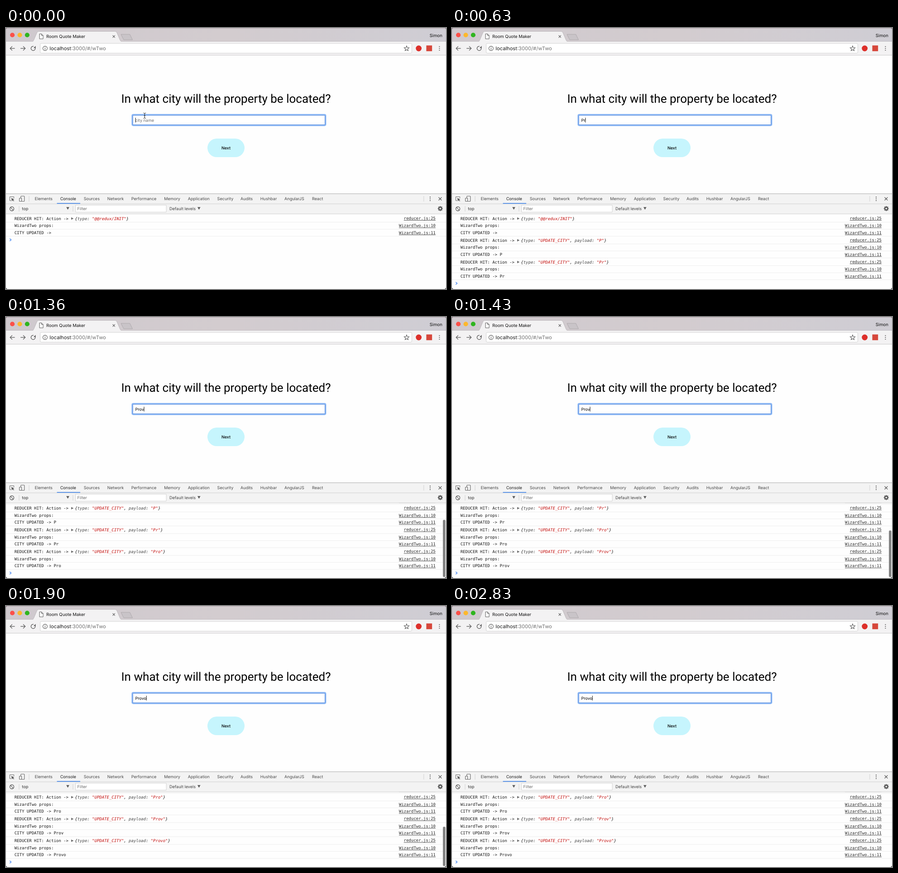
Animation, 972 px wide and 576 px high, one loop 3.03 s. Source, as an HTML page with a canvas:

```html
<!DOCTYPE html>
<html lang="en">
<head>
<meta charset="utf-8">
<title>Room Quote Maker</title>
<style>
html, body { margin: 0; width: 100%; height: 100%; overflow: hidden; background: #fefefe; }
canvas { display: block; width: 972px; height: 576px; }
</style>
</head>
<body>
<canvas id="stage"></canvas>
<script>
const W = 972, H = 576, LOOP = 3030;
const UI = "Inter, 'Liberation Sans', sans-serif";
const MONO = "'DejaVu Sans Mono', 'Liberation Mono', monospace";
const CITY = "Provo";
// Per letter: shown in the field, action logged, props logged.
const KEYS = [[130, 200, 230], [560, 600, 630], [960, 1000, 1030], [1360, 1400, 1430], [1830, 1860, 1900]];
const BLINK_OFF = 2330, BLINK_ON = 2830, FADE_STEP = 50, FADE_STEPS = 6;

const canvas = document.getElementById("stage");
const dpr = window.devicePixelRatio || 1;
canvas.width = W * dpr;
canvas.height = H * dpr;
const ctx = canvas.getContext("2d");

function rect(x, y, w, h, color) {
  ctx.fillStyle = color;
  ctx.fillRect(x, y, w, h);
}

function box(x, y, w, h, r, fill, stroke, width = 1) {
  ctx.beginPath();
  ctx.roundRect(x, y, w, h, r);
  paint(fill, stroke, width);
}

function disc(x, y, r, fill, stroke, width = 1) {
  ctx.beginPath();
  ctx.arc(x, y, r, 0, Math.PI * 2);
  paint(fill, stroke, width);
}

function poly(points, fill, stroke, width = 1, closed = true) {
  ctx.beginPath();
  points.forEach(([x, y]) => ctx.lineTo(x, y));
  if (closed) ctx.closePath();
  paint(fill, stroke, width);
}

function line(x1, y1, x2, y2, color, width = 1) {
  poly([[x1, y1], [x2, y2]], null, color, width, false);
}

function paint(fill, stroke, width) {
  if (fill) { ctx.fillStyle = fill; ctx.fill(); }
  if (stroke) { ctx.strokeStyle = stroke; ctx.lineWidth = width; ctx.stroke(); }
}

// Draws text and returns its width.
function text(str, x, y, size, color, family = UI, style = "", align = "left") {
  ctx.font = `${style} ${size}px ${family}`;
  ctx.textAlign = align;
  ctx.fillStyle = color;
  ctx.fillText(str, x, y);
  return ctx.measureText(str).width;
}

function cross(x, y, r, color, width) {
  line(x - r, y - r, x + r, y + r, color, width);
  line(x - r, y + r, x + r, y - r, color, width);
}

function dots(x, y, gap, color) {
  for (let i = -1; i <= 1; i++) disc(x, y + i * gap, 1.1, color);
}

function downArrow(x, y) {
  poly([[x - 3.3, y - 2.7], [x + 3.3, y - 2.7], [x, y + 3]], "#5a5a5a");
}

function navArrow(x, y, dir) {
  const tip = x + dir * 5.2;
  line(x - dir * 5.2, y, tip, y, "#5a5a5a", 1.3);
  poly([[tip - dir * 4.6, y - 4.6], [tip, y], [tip - dir * 4.6, y + 4.6]], null, "#5a5a5a", 1.3, false);
}

function star(x, y, r) {
  const points = [];
  for (let i = 0; i < 10; i++) {
    const a = -Math.PI / 2 + i * Math.PI / 5, d = i % 2 ? r * 0.45 : r;
    points.push([x + d * Math.cos(a), y + d * Math.sin(a)]);
  }
  poly(points, null, "#5a5a5a", 1.1);
}

function gear(x, y) {
  for (let i = 0; i < 4; i++) {
    const a = i * Math.PI / 4, dx = 5.5 * Math.cos(a), dy = 5.5 * Math.sin(a);
    line(x - dx, y - dy, x + dx, y + dy, "#5a5a5a", 2.1);
  }
  disc(x, y, 4.2, "#5a5a5a");
  disc(x, y, 1.8, "#f3f3f3");
}

function drawTabStrip() {
  const strip = ctx.createLinearGradient(0, 0, W, 0);
  strip.addColorStop(0, "#cfc9ce");
  strip.addColorStop(0.5, "#d3cccf");
  strip.addColorStop(1, "#cfcdd4");
  rect(0, 0, W, 30, strip);
  rect(0, 0, W, 1, "#b9abb3");
  rect(0, 29.5, W, 0.8, "#b4b0b4");
  ["#fb5049", "#fdb82c", "#2fb51f"].forEach((c, i) => disc(14 + i * 16.4, 15.5, 5.1, c));

  ctx.beginPath();
  ctx.moveTo(57, 31);
  ctx.quadraticCurveTo(60, 30, 61.5, 26.5);
  ctx.lineTo(68, 11);
  ctx.quadraticCurveTo(69.3, 7.5, 72, 7.5);
  ctx.lineTo(241, 7.5);
  ctx.quadraticCurveTo(244, 7.5, 245.3, 11);
  ctx.lineTo(251.8, 26.5);
  ctx.quadraticCurveTo(253.3, 30, 257, 31);
  paint("#f3f2f3", "#b4b0b4", 0.8);
  poly([[74, 13], [78.5, 13], [82, 16.5], [82, 24], [74, 24]], "#fff", "#5a5a5a", 1);
  poly([[78.5, 13], [78.5, 16.5], [82, 16.5]], null, "#5a5a5a", 1, false);
  text("Room Quote Maker", 89, 22, 9.5, "#111");
  cross(238.2, 18.7, 2.6, "#5a5a5a", 1.1);
  poly([[254, 14], [273.5, 14], [279.5, 26], [260, 26]], "#c9c4c8", "#aaa5a9", 0.9);
  text("Simon", 964, 20, 9.6, "#111", UI, "", "right");
}

function drawToolbar() {
  rect(0, 30, W, 30, "#f3f2f3");
  rect(0, 59.5, W, 1, "#c9c8c9");
  navArrow(14.3, 45, -1);
  navArrow(37.3, 45, 1);
  ctx.beginPath();
  ctx.arc(60, 45, 4.7, -0.5, Math.PI * 1.72 - 0.5, false);
  paint(null, "#5a5a5a", 1.3);
  poly([[65.5, 39.6], [65.5, 44.3], [60.8, 44.3]], "#5a5a5a");

  box(75.5, 34, 821, 21.5, 2.5, "#fff", "#cfcecf", 0.9);
  disc(86.3, 45, 4.9, null, "#5a5a5a", 1.1);
  rect(85.7, 44.2, 1.2, 3.6, "#5a5a5a");
  rect(85.7, 42, 1.2, 1.2, "#5a5a5a");
  const host = text("localhost", 96.3, 49, 11.15, "#1a1a1a");
  text(":3000/#/wTwo", 96.3 + host, 49, 11.15, "#707070");
  star(885, 45.3, 5.8);
  disc(911.7, 45, 6.4, "#dd2f2a");
  rect(928.5, 38.5, 12.7, 12.7, "#d6473b");
  dots(957.5, 45, 4, "#5a5a5a");
}

function drawPage(t, typed) {
  text("In what city will the property be located?", 486, 165, 26.05, "#000",
    "Roboto, sans-serif", "", "center");

  box(278.6, 191.1, 427.6, 24, 2.5, "#fff", "#8fbaf6", 2.6);
  box(280.1, 192.6, 424.6, 21, 1.2, null, "#5c90df", 1.3);
  let caret = 286;
  if (typed) caret = 285.5 + text(CITY.slice(0, typed), 285.5, 206.5, 9, "#000");
  else text("city name", 285.5, 206.5, 9, "#6c6c6c");
  if (t < BLINK_OFF || t >= BLINK_ON) rect(caret - 0.3, 198, 1, 10.5, "#111");
  if (!typed) drawIBeam(306.3, 193.5);

  box(445, 244, 82, 41, 20.5, "#c6f5fd");
  text("Next", 486, 267.8, 9, "#000", UI, "500", "center");
}

function drawIBeam(x, y) {
  line(x, y - 5.3, x, y + 5.3, "#333", 1.1);
  line(x - 1.8, y, x + 1.8, y, "#333", 0.9);
  for (const s of [-1, 1]) {
    poly([[x - 2.8, y + s * 6.2], [x, y + s * 5], [x + 2.8, y + s * 6.2]], null, "#333", 1, false);
  }
}

function drawDevtoolsBars() {
  const tabs = [["Elements", 63.6], ["Console", 119.7], ["Sources", 171.7], ["Network", 223.8],
    ["Performance", 276.7], ["Memory", 349.3], ["Application", 401.7], ["Security", 466.6],
    ["Audits", 518], ["Hushbar", 561.8], ["AngularJS", 615], ["React", 676]];
  rect(0, 365.5, W, 45, "#f3f3f3");
  rect(0, 365.3, W, 1, "#a8a8a8");
  rect(0, 387.6, W, 0.9, "#cccccc");
  rect(0, 409.8, W, 0.9, "#cccccc");
  rect(112.5, 386.3, 51.5, 1.6, "#4285e8");
  for (const [label, x] of tabs) text(label, x, 380.3, 9.1, label === "Console" ? "#1a1a1a" : "#484848");

  poly([[12, 381], [8.3, 381], [8.3, 372.5], [17.5, 372.5], [17.5, 375.5]], null, "#666", 1, false);
  poly([[11.5, 375.3], [18.5, 378], [15.6, 379.1], [18, 381.6], [17, 382.6], [14.7, 380.2], [13.5, 382.5]], "#5a5a5a");
  box(32.7, 371, 8, 11.5, 1, null, "#666", 1.1);
  box(29.5, 375.5, 5, 7, 0.8, "#f3f3f3", "#666", 1.1);
  for (const [x, y] of [[50.5, 371], [922.5, 371], [28.5, 393], [147.5, 393]]) rect(x, y, 0.9, 12, "#cccccc");
  dots(937, 377, 3.8, "#5a5a5a");
  cross(959, 377, 3.4, "#4a4a4a", 1.3);

  disc(13, 399, 4.5, null, "#5a5a5a", 1.3);
  line(9.9, 395.9, 16.1, 402.1, "#5a5a5a", 1.3);
  text("top", 35.3, 401.8, 9.1, "#2b2b2b");
  downArrow(136.5, 398);
  box(153.5, 391, 200.5, 15.3, 0, "#fff", "#cfcfcf", 0.9);
  text("Filter", 157.5, 401.8, 9.1, "#6c6c6c");
  text("Default levels", 361, 401.8, 9.1, "#404040");
  downArrow(426.3, 398);
  gear(959.3, 398.5);
}

// All console messages present at time t.
function messages(t) {
  const rows = [];
  const action = payload => rows.push({ payload, link: "reducer.js:25", height: 17, lift: 1 });
  const update = value => rows.push(
    { label: "WizardTwo props:", link: "WizardTwo.js:10", height: 15.5, lift: 0 },
    { label: "CITY UPDATED -> " + value, link: "WizardTwo.js:11", height: 15.5, lift: 0 });
  action("");
  update("");
  KEYS.forEach(([, logged, done], i) => {
    const value = CITY.slice(0, i + 1);
    if (t >= logged) action(value);
    if (t >= done) update(value);
  });
  return rows;
}

function drawAction(payload, y) {
  const dark = "#1c1c1c", grey = "#444", red = "#c20a08";
  const parts = [["{", dark], ["type", grey], [": ", dark]];
  if (payload) {
    parts.push(['"UPDATE_CITY"', red], [", ", dark], ["payload", grey], [": ", dark], [`"${payload}"`, red]);
  } else {
    parts.push(['"@@redux/INIT"', red]);
  }
  parts.push(["}", dark]);
  text("REDUCER HIT: Action ->", 18.7, y, 9, "#161616", MONO);
  poly([[144, y - 6], [149.3, y - 3.3], [144, y - 0.6]], "#6e6e6e");
  let x = 152.3;
  for (const [str, color] of parts) x += text(str, x, y, 8.97, color, MONO, "italic");
}

function drawConsole(t) {
  const rows = messages(t);
  const end = rows.reduce((sum, row) => sum + row.height, 411.5);
  const scroll = Math.max(0, end + 8 - 565);
  ctx.save();
  ctx.beginPath();
  ctx.rect(0, 410.7, W, H - 410.7);
  ctx.clip();
  let bottom = 411.5 - scroll;
  for (const row of rows) {
    bottom += row.height;
    if (bottom < 405) continue;
    const y = bottom - 4.7;
    if (row.label) text(row.label, 18.7, y, 9, "#161616", MONO);
    else drawAction(row.payload, y);
    const w = text(row.link, 949, y - row.lift, 8.97, "#262626", MONO, "", "right");
    rect(949 - w, y - row.lift + 1.2, w, 0.8, "#262626");
    rect(0, bottom - 0.4, W, 0.9, "#ececec");
  }
  const p = bottom + 8;
  poly([[8.2, p - 2.7], [11.4, p], [8.2, p + 2.7]], null, "#3b7eee", 1.3, false);
  ctx.restore();
  if (scroll) drawScrollbar(t, scroll);
}

function drawScrollbar(t, scroll) {
  const step = Math.max(0, Math.floor((t - BLINK_OFF) / FADE_STEP));
  const height = 162 * 165 / (165 + scroll);
  ctx.globalAlpha = Math.max(0, 1 - step / FADE_STEPS);
  box(965.2, 574 - height, 5.4, height, 2.7, "#7f7f7f");
  ctx.globalAlpha = 1;
}

function drawCorners() {
  const r = 4;
  for (const [x, y, dx, dy, color] of [[0, 0, 1, 1, "#8d6f80"], [W, 0, -1, 1, "#8d6f80"],
    [0, H, 1, -1, "#1b1b22"], [W, H, -1, -1, "#1b1b22"]]) {
    ctx.beginPath();
    ctx.moveTo(x, y);
    ctx.lineTo(x + dx * r, y);
    ctx.quadraticCurveTo(x, y, x, y + dy * r);
    paint(color);
  }
}

function draw(t) {
  ctx.setTransform(dpr, 0, 0, dpr, 0, 0);
  ctx.textRendering = "geometricPrecision";
  ctx.textBaseline = "alphabetic";
  rect(0, 0, W, H, "#fefefe");
  drawTabStrip();
  drawToolbar();
  drawPage(t, KEYS.filter(key => t >= key[0]).length);
  drawDevtoolsBars();
  drawConsole(t);
  drawCorners();
}

const start = performance.now();
function tick() {
  draw((performance.now() - start) % LOOP);
  requestAnimationFrame(tick);
}
tick();
</script>
</body>
</html>
```
